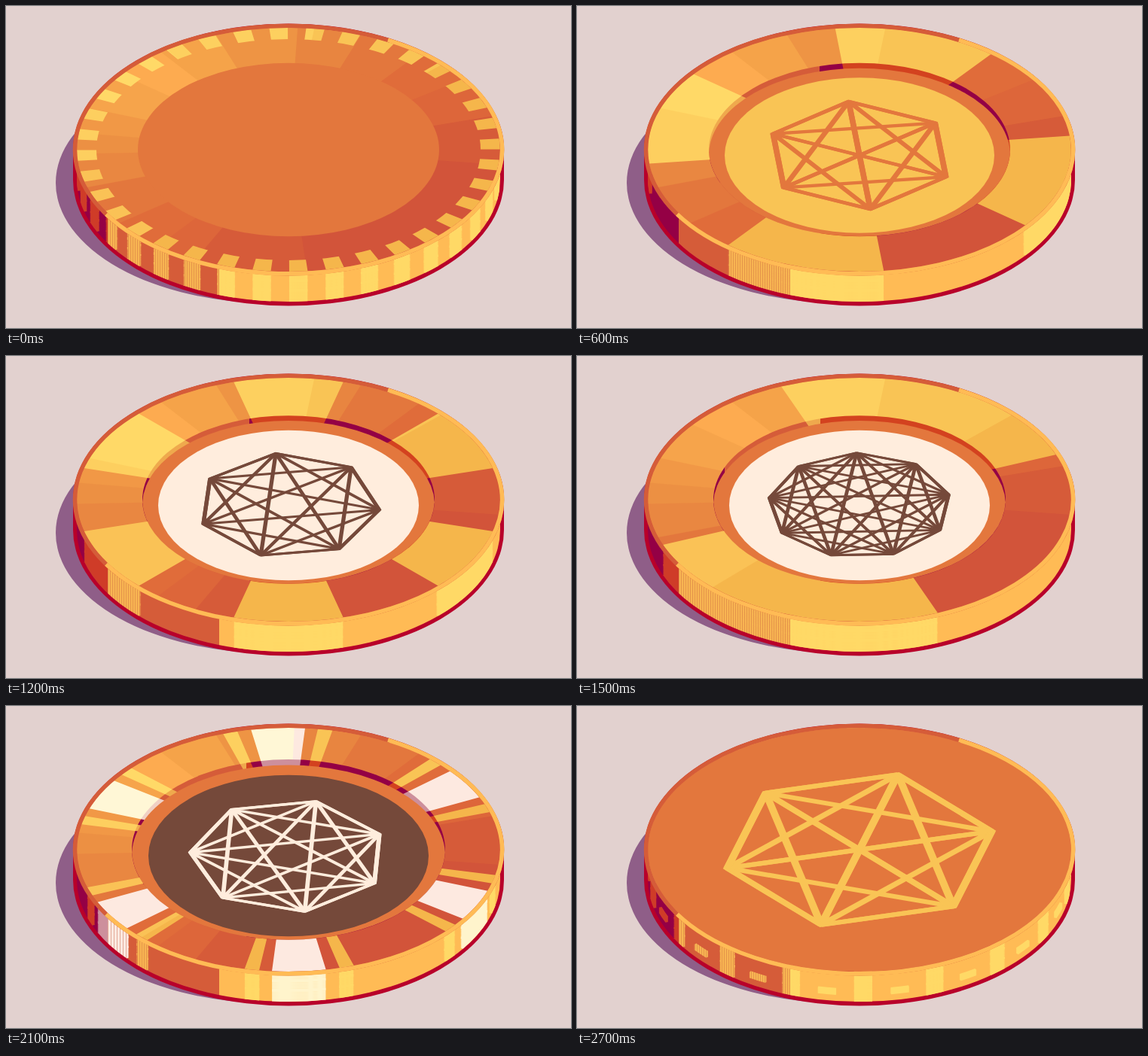
An HTML page without scripts for the animation above (3 s loop, 750 px wide and 428 px high).

```html
<!DOCTYPE html>
<html lang="en">
<head>
<meta charset="utf-8">
<title>Coins</title>
<style>
html, body { margin: 0; width: 100%; height: 100%; overflow: hidden; background: #e2d1cf; }
svg { display: block; width: 100%; height: 100%; }
.pie { r: 140.5px; fill: none; stroke-width: 281px; }
.coin { visibility: hidden; animation: show 3s step-end infinite; animation-delay: calc(.3s * var(--i) - 3s); }
@keyframes show { 0% { visibility: visible; } 10%, 100% { visibility: hidden; } }
.orange { fill: #e3773d; }
.gold { fill: #f9c455; }
.brown { fill: #75493a; }
.cream { fill: #ffeddd; }
.net { fill: none; }
</style>
</head>
<body>
<svg viewBox="-375 -191 750 428">
<defs>
  <linearGradient id="sideFill" gradientUnits="userSpaceOnUse" x1="-281" x2="281">
    <stop offset=".073" stop-color="#940045"/><stop offset=".073" stop-color="#d55c39"/>
    <stop offset=".336" stop-color="#d55c39"/><stop offset=".336" stop-color="#ffbb55"/>
  </linearGradient>
  <linearGradient id="wallFill" gradientUnits="userSpaceOnUse" x1="-281" x2="281">
    <stop offset=".171" stop-color="#940045"/><stop offset=".171" stop-color="#d55c39"/>
    <stop offset=".405" stop-color="#d55c39"/><stop offset=".405" stop-color="#940045"/>
  </linearGradient>
  <linearGradient id="wallGold" gradientUnits="userSpaceOnUse" x1="-281" x2="281">
    <stop offset=".405" stop-color="#efa94d"/><stop offset=".405" stop-color="#d3421f"/>
  </linearGradient>
  <linearGradient id="wallCream" gradientUnits="userSpaceOnUse" x1="-281" x2="281">
    <stop offset=".405" stop-color="#f0d0c4"/><stop offset=".405" stop-color="#cd8f9c"/>
  </linearGradient>
  <pattern id="goldHatch" width="3" height="8" patternUnits="userSpaceOnUse">
    <rect width="3" height="8" fill="#f8b552"/><rect width="1" height="8" fill="#e5954a"/>
  </pattern>
  <pattern id="creamHatch" width="4" height="8" patternUnits="userSpaceOnUse">
    <rect width="4" height="8" fill="#fde9e0"/><rect width="1" height="8" fill="#e3ac9a"/>
  </pattern>

  <!-- lit sectors, each painted from its start angle onward -->
  <g id="tan" transform="scale(1 .5765) rotate(-90)">
    <circle class="pie" stroke="#ee9444"/>
    <circle class="pie" pathLength="360" stroke="#e88540" stroke-dasharray="0 2.5 360"/>
    <circle class="pie" pathLength="360" stroke="#e3773d" stroke-dasharray="0 20 360"/>
    <circle class="pie" pathLength="360" stroke="#e06c3a" stroke-dasharray="0 38 360"/>
    <circle class="pie" pathLength="360" stroke="#dd663a" stroke-dasharray="0 55 360"/>
    <circle class="pie" pathLength="360" stroke="#d65b39" stroke-dasharray="0 74 360"/>
    <circle class="pie" pathLength="360" stroke="#d2543a" stroke-dasharray="0 97 360"/>
    <circle class="pie" pathLength="360" stroke="#d65b39" stroke-dasharray="0 175 360"/>
    <circle class="pie" pathLength="360" stroke="#dd663a" stroke-dasharray="0 206 360"/>
    <circle class="pie" pathLength="360" stroke="#e06c3a" stroke-dasharray="0 218 360"/>
    <circle class="pie" pathLength="360" stroke="#e3773d" stroke-dasharray="0 233 360"/>
    <circle class="pie" pathLength="360" stroke="#e98741" stroke-dasharray="0 252 360"/>
    <circle class="pie" pathLength="360" stroke="#ec9043" stroke-dasharray="0 268 360"/>
    <circle class="pie" pathLength="360" stroke="#f19846" stroke-dasharray="0 278 360"/>
    <circle class="pie" pathLength="360" stroke="#f6a44b" stroke-dasharray="0 290 360"/>
    <circle class="pie" pathLength="360" stroke="#fdab50" stroke-dasharray="0 308 360"/>
    <circle class="pie" pathLength="360" stroke="#f5a349" stroke-dasharray="0 323 360"/>
    <circle class="pie" pathLength="360" stroke="#ee9444" stroke-dasharray="0 340 360"/>
  </g>
  <!-- side rects span the face too, so the mask region covers the whole coin -->
  <g id="gold">
    <rect x="-281" y="-162" width="41" height="372" fill="#cf3c28"/>
    <rect x="-240" y="-162" width="148" height="372" fill="url(#goldHatch)"/>
    <rect x="-92" y="-162" width="373" height="372" fill="#ffd966"/>
    <g transform="scale(1 .5765) rotate(-90)">
      <circle class="pie" stroke="#fdd05f"/>
      <circle class="pie" pathLength="360" stroke="#f9c455" stroke-dasharray="0 7 360"/>
      <circle class="pie" pathLength="360" stroke="#f5b64b" stroke-dasharray="0 46 360"/>
      <circle class="pie" pathLength="360" stroke="#fac256" stroke-dasharray="0 224 360"/>
      <circle class="pie" pathLength="360" stroke="#fdcf5f" stroke-dasharray="0 262 360"/>
      <circle class="pie" pathLength="360" stroke="#ffd967" stroke-dasharray="0 290 360"/>
      <circle class="pie" pathLength="360" stroke="#fdd05f" stroke-dasharray="0 325 360"/>
    </g>
  </g>
  <g id="cream">
    <rect x="-281" y="-162" width="41" height="372" fill="#cd8f9c"/>
    <rect x="-240" y="-162" width="148" height="372" fill="url(#creamHatch)"/>
    <rect x="-92" y="-162" width="373" height="372" fill="#fff4cc"/>
    <g transform="scale(1 .5765) rotate(-90)">
      <circle class="pie" stroke="#fde9e0"/>
      <circle class="pie" pathLength="360" stroke="#fff7d6" stroke-dasharray="0 262 360"/>
      <circle class="pie" pathLength="360" stroke="#fff7d6" stroke-dasharray="1.6 360"/>
    </g>
  </g>

  <!-- edge arcs swept downwards; dashes are inherited from the user -->
  <circle id="s0" r="279" pathLength="360" fill="none" stroke-width="4" transform="scale(1 .5765) rotate(-90)"/>
  <g id="s1"><use href="#s0"/><use href="#s0" y="2"/></g>
  <g id="s2"><use href="#s1"/><use href="#s1" y="4"/></g>
  <g id="s3"><use href="#s2"/><use href="#s2" y="8"/></g>
  <g id="tall"><use href="#s3"/><use href="#s3" y="13"/><use href="#s3" y="26"/></g>
  <g id="band"><use href="#s2" y="25"/><use href="#s2" y="26"/></g>
  <g id="cut">
    <use href="#tall"/>
    <ellipse rx="281" ry="162" fill="#000" stroke="none"/>
    <circle class="pie" pathLength="360" transform="scale(1 .5765) rotate(-90)"/>
  </g>

  <mask id="m0" stroke="#fff">
    <use href="#cut" stroke-dasharray="5" stroke-dashoffset="5.2"/>
    <circle r="255" transform="scale(1 .5765)" fill="#000" stroke="none"/>
  </mask>
  <mask id="m1" stroke="#fff"><use href="#cut" stroke-dasharray="15" stroke-dashoffset="7.5"/></mask>
  <mask id="m2" stroke="#fff"><use href="#cut" stroke-dasharray="45" stroke-dashoffset="6.6"/></mask>
  <mask id="m3" stroke="#fff"><use href="#cut" stroke-dasharray="11.4 18.6" stroke-dashoffset="15.8"/></mask>
  <mask id="m3c" stroke="#fff"><use href="#cut" stroke-dasharray="5 25" stroke-dashoffset="12.5"/></mask>
  <mask id="m4" stroke="#fff"><use href="#cut" stroke-dasharray="30" stroke-dashoffset="15"/></mask>
  <mask id="m5" stroke="#fff"><use href="#cut" stroke-dasharray="90" stroke-dashoffset="21.7"/></mask>
  <mask id="m6" stroke="#fff"><use href="#band" stroke-dasharray="90" stroke-dashoffset="-19.3"/></mask>
  <mask id="m7" stroke="#fff"><use href="#cut" stroke-dasharray="4 22 4 30" stroke-dashoffset="18"/></mask>
  <mask id="m7c" stroke="#fff"><use href="#cut" stroke-dasharray="14.7 45.3" stroke-dashoffset="10.2"/></mask>
  <mask id="m8" stroke="#fff"><use href="#tall" stroke-dasharray="10 20" stroke-dashoffset="5"/></mask>
  <mask id="m9" stroke="#fff">
    <use href="#tall" stroke-dasharray="5 15" stroke-dashoffset="3.5"/>
    <use href="#band" stroke-dasharray="5 15" stroke-dashoffset="-6.4"/>
  </mask>

  <!-- recess: wall and floor -->
  <circle id="wall" r="200" fill="url(#wallFill)" transform="scale(1 .5765)"/>
  <circle id="wallG" r="200" fill="url(#wallGold)" transform="scale(1 .5765)"/>
  <circle id="wallC" r="200" fill="url(#wallCream)" transform="scale(1 .5765)"/>
  <path id="floor" class="orange" transform="scale(1 .5765)" d="M-199.9 6A200 200 0 0 1 199.9 6A200 200 0 0 1-199.9 6Z"/>

  <!-- complete graphs, one vertex fan repeated -->
  <path id="f6" d="M-86.6-50L0-100 86.6-50M0-100L86.6 50M0-100V100"/>
  <g id="k6">
    <use href="#f6"/><use href="#f6" transform="rotate(60)"/><use href="#f6" transform="rotate(120)"/>
    <use href="#f6" transform="rotate(180)"/><use href="#f6" transform="rotate(240)"/><use href="#f6" transform="rotate(300)"/>
  </g>
  <path id="f7" d="M-78.2-62.3L0-100 78.2-62.3M0-100L97.5 22.3M0-100L43.4 90.1"/>
  <g id="k7">
    <use href="#f7"/><use href="#f7" transform="rotate(51.43)"/><use href="#f7" transform="rotate(102.86)"/>
    <use href="#f7" transform="rotate(154.29)"/><use href="#f7" transform="rotate(205.71)"/>
    <use href="#f7" transform="rotate(257.14)"/><use href="#f7" transform="rotate(308.57)"/>
  </g>
  <path id="f9" d="M-64.3-76.6L0-100 64.3-76.6M0-100L98.5-17.4M0-100L86.6 50M0-100L34.2 94"/>
  <g id="t9"><use href="#f9"/><use href="#f9" transform="rotate(40)"/><use href="#f9" transform="rotate(80)"/></g>
  <g id="k9"><use href="#t9"/><use href="#t9" transform="rotate(120)"/><use href="#t9" transform="rotate(240)"/></g>
</defs>

<ellipse cx="-23" cy="44" rx="286" ry="160" fill="#8f5e88"/>
<path d="M-286 0A286 167.5 0 0 1 286 0V40A286 167.5 0 0 1-286 40Z" fill="#b8002a"/>
<path d="M-281 0A281 162 0 0 1 281 0V40A281 162 0 0 1-281 40Z" fill="url(#sideFill)"/>
<use href="#tan"/>

<g class="coin" style="--i:0">
  <use href="#gold" mask="url(#m0)"/>
  <circle class="orange" r="200" transform="scale(1 .5765)"/>
</g>

<g class="coin" style="--i:1">
  <use href="#wall" transform="scale(.98)"/>
  <g mask="url(#m1)"><use href="#gold"/><use href="#wallG" transform="scale(.98)"/></g>
  <use href="#floor" transform="scale(.98)"/>
  <g transform="translate(0 7.5) scale(1 .5765)">
    <circle class="gold" r="175"/>
    <use href="#k7" class="net" stroke="#e3773d" stroke-width="5.4" transform="rotate(5) scale(1.23)"/>
  </g>
</g>

<g class="coin" style="--i:2">
  <use href="#wall"/>
  <g mask="url(#m2)"><use href="#gold"/><use href="#wallG"/></g>
  <use href="#floor"/>
  <g transform="translate(0 7.5) scale(1 .5765)">
    <circle class="gold" r="179"/>
    <use href="#k6" class="net" stroke="#e3773d" stroke-width="6" transform="rotate(-6.6) scale(1.25)"/>
  </g>
</g>

<g class="coin" style="--i:3">
  <use href="#wall" transform="scale(.96)"/>
  <g mask="url(#m3)"><use href="#gold"/><use href="#wallG" transform="scale(.96)"/></g>
  <g mask="url(#m3c)"><use href="#cream"/><use href="#wallC" transform="scale(.96)"/></g>
  <use href="#floor" transform="scale(.96)"/>
  <g transform="translate(0 7.5) scale(1 .5765)">
    <circle class="brown" r="171"/>
    <use href="#k6" class="net" stroke="#ffeddd" stroke-width="4.8" transform="rotate(-16.2) scale(1.21)"/>
  </g>
</g>

<g class="coin" style="--i:4">
  <use href="#wall" transform="scale(.97)"/>
  <g mask="url(#m4)"><use href="#gold"/><use href="#wallG" transform="scale(.97)"/></g>
  <use href="#floor" transform="scale(.97)"/>
  <g transform="translate(0 7.5) scale(1 .5765)">
    <circle class="cream" r="173"/>
    <use href="#k7" class="net" stroke="#75493a" stroke-width="4.4" transform="rotate(-8) scale(1.21)"/>
  </g>
</g>

<g class="coin" style="--i:5">
  <use href="#wall" transform="scale(.97)"/>
  <g mask="url(#m5)"><use href="#gold"/><use href="#wallG" transform="scale(.97)"/></g>
  <use href="#floor" transform="scale(.97)"/>
  <g transform="translate(0 7.5) scale(1 .5765)">
    <circle class="cream" r="173"/>
    <use href="#k9" class="net" stroke="#75493a" stroke-width="4" transform="rotate(-1.8) scale(1.21)"/>
  </g>
</g>

<g class="coin" style="--i:6">
  <use href="#gold" mask="url(#m6)"/>
  <g transform="scale(1 .5765)">
    <circle class="orange" r="281"/>
    <circle class="cream" r="258"/>
    <use href="#k7" class="net" stroke="#75493a" stroke-width="5.2" transform="rotate(-6.3) scale(1.8)"/>
  </g>
</g>

<g class="coin" style="--i:7">
  <use href="#wall" transform="scale(1.04)"/>
  <g mask="url(#m7)"><use href="#gold"/><use href="#wallG" transform="scale(1.04)"/></g>
  <g mask="url(#m7c)"><use href="#cream"/><use href="#wallC" transform="scale(1.04)"/></g>
  <use href="#floor" transform="scale(1.04)"/>
  <g transform="translate(0 8) scale(1 .5765)">
    <circle class="brown" r="186"/>
    <use href="#k7" class="net" stroke="#ffeddd" stroke-width="4.4" transform="rotate(16.2) scale(1.305)"/>
  </g>
</g>

<g class="coin" style="--i:8">
  <use href="#gold" mask="url(#m8)"/>
  <g transform="scale(1 .5765)">
    <circle class="orange" r="281"/>
    <use href="#k7" class="net" stroke="#f9c455" stroke-width="5.4" transform="scale(1.8)"/>
  </g>
</g>

<g class="coin" style="--i:9">
  <use href="#gold" mask="url(#m9)"/>
  <g transform="scale(1 .5765)">
    <circle class="orange" r="281"/>
    <use href="#k6" class="net" stroke="#f9c455" stroke-width="5.7" transform="rotate(16.4) scale(1.805)"/>
  </g>
</g>

<g fill="none" stroke-width="5.5">
  <ellipse rx="283.5" ry="164.75" stroke="#d55c39"/>
  <path d="M132-145.8A283.5 164.75 0 1 1-242 85.8" stroke="#ffbb55"/>
</g>
</svg>
</body>
</html>
```
